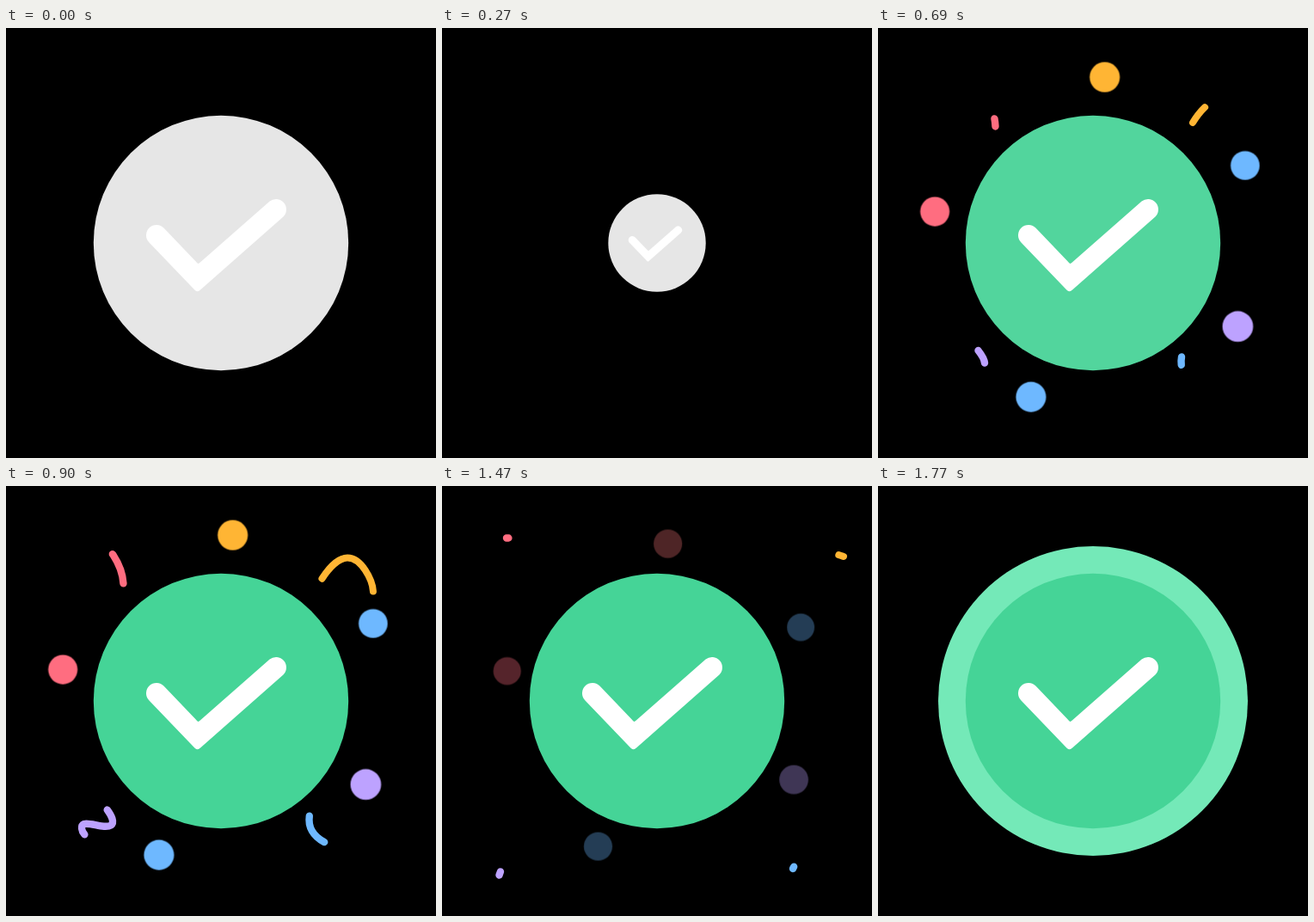
These frames come from a looping animation (500 px wide and 500 px high, 1.83 s). An HTML page:

```html
<!DOCTYPE html>
<html lang="en">
<head>
<meta charset="utf-8">
<title>Success check</title>
<style>
  @property --head { syntax: "<number>"; inherits: true; initial-value: 0; }
  @property --tail { syntax: "<number>"; inherits: true; initial-value: 0; }

  :root {
    --loop: 1830ms infinite both;
    --ease: cubic-bezier(.333, 0, .667, 1);
    --red: #ff6d80;
    --gold: #ffb534;
    --dim-gold: #d18739;
    --blue: #6eb8ff;
    --purple: #bda2ff;
  }
  html, body { margin: 0; width: 100%; height: 100%; overflow: hidden; background: #000; }
  svg { display: block; width: 100%; height: 100%; }

  .badge { transform-origin: 250px 250px; animation: badge var(--ease) var(--loop); }
  .disc { animation: tint var(--ease) var(--loop); }
  .ring { fill: #74e9b8; transform-origin: 250px 250px; animation: ring var(--ease) var(--loop); }
  .dots {
    transform-origin: 246px 244px;
    animation: burst var(--ease) var(--loop), fade var(--ease) var(--loop);
  }
  .dots circle { fill: currentColor; }
  .streaks {
    fill: none;
    stroke-width: 8.4;
    stroke-linecap: round;
    animation: head var(--ease) var(--loop), tail var(--ease) var(--loop), show step-end var(--loop);
  }
  .streaks path {
    stroke: currentColor;
    stroke-dasharray: calc((var(--head) - var(--tail)) * 1px) 300px;
    stroke-dashoffset: calc(var(--tail) * -1px);
  }
  .red { color: var(--red); }
  .blue { color: var(--blue); }
  .purple { color: var(--purple); }
  .dots .gold { animation: gold-dot linear var(--loop); }
  .streaks .gold { stroke-width: 8; animation: gold-streak step-end var(--loop); }

  @keyframes badge {
    0% { transform: scale(1); }
    19.67% { transform: scale(.271); }
    34.43%, 100% { transform: scale(1); }
  }
  @keyframes tint {
    0%, 19.67% { fill: #e6e6e6; }
    41.53%, 100% { fill: #45d497; }
  }
  @keyframes ring {
    0%, 87.43% { transform: scale(0); }
    87.44% { transform: scale(.82); }
    96.72%, 100% { transform: scale(1); }
  }
  @keyframes burst {
    0%, 19.67% { transform: scale(0); }
    34.97%, 50.82% { transform: scale(1.002); }
    88.52%, 100% { transform: scale(.941); }
  }
  @keyframes fade {
    0%, 68.85% { opacity: 1; }
    87.7%, 100% { opacity: 0; }
  }
  @keyframes head {
    0%, 28.69% { --head: 0; }
    75.14%, 100% { --head: 100; }
  }
  @keyframes tail {
    0%, 46.83% { --tail: 0; }
    83.99%, 100% { --tail: 100; }
  }
  @keyframes show {
    0% { opacity: 0; }
    28.7% { opacity: 1; }
    83.99%, 100% { opacity: 0; }
  }
  @keyframes gold-dot {
    0%, 30.33% { color: var(--dim-gold); }
    30.34%, 68.85% { color: var(--gold); }
    80.33%, 100% { color: #eb7173; }
  }
  @keyframes gold-streak {
    0% { color: var(--dim-gold); }
    30.33%, 100% { color: var(--gold); }
  }
</style>
</head>
<body>
<svg viewBox="0 0 500 500">
  <g class="dots">
    <circle class="red" cx="66.5" cy="213.5" r="17"/>
    <circle class="gold" cx="263.6" cy="57.5" r="17.5"/>
    <circle class="blue" cx="426.5" cy="160" r="16.8"/>
    <circle class="purple" cx="418" cy="346.8" r="17.8"/>
    <circle class="blue" cx="178" cy="428.6" r="17.5"/>
  </g>
  <g class="streaks">
    <path class="red" pathLength="100"
      d="M136.5 114.5C136 101 131 90 124.5 80C116 70 104 64.500 90 62C85 61 80 60.500 75 60.500"/>
    <path class="gold" pathLength="100"
      d="M366 110C374 97 386 83.500 397 83.500C414 83.500 427 111 427 124C427 129 425 130.500 422 131
         C419 133 415 133 412 131.500C402 128 396 120 397 112C399 100 416 83 433 78C447 75 458 79 467 82"/>
    <path class="purple" pathLength="100"
      d="M116.500 375C122 382 127 391 122 394.500C115 399 98 391 91 393C86 395 88 402 92 406
         L96 411C102 417 106 427 99 428.500C90 430 76 418 68 420C64 421 64 425 65 428
         C67 434 70 441 68.500 447L66.500 452.500"/>
    <path class="blue" pathLength="100"
      d="M353 382.500C350.500 396 357 407 370 414C383 420 396 424 406 432C411 436 411 440 408 445"/>
  </g>
  <circle class="ring" cx="250" cy="250" r="180"/>
  <g class="badge">
    <circle class="disc" cx="250" cy="250" r="148.200"/>
    <path fill="#fff"
      d="M166.300 249.300L219.300 304.500Q222.500 307.800 226 304.500L322.400 219.500A12 12 0 0 0 306.600 201.500
         L225.500 272.800Q223.200 275.500 221 271.800L183.700 232.700A12 12 0 0 0 166.300 249.300Z"/>
  </g>
</svg>
</body>
</html>
```
